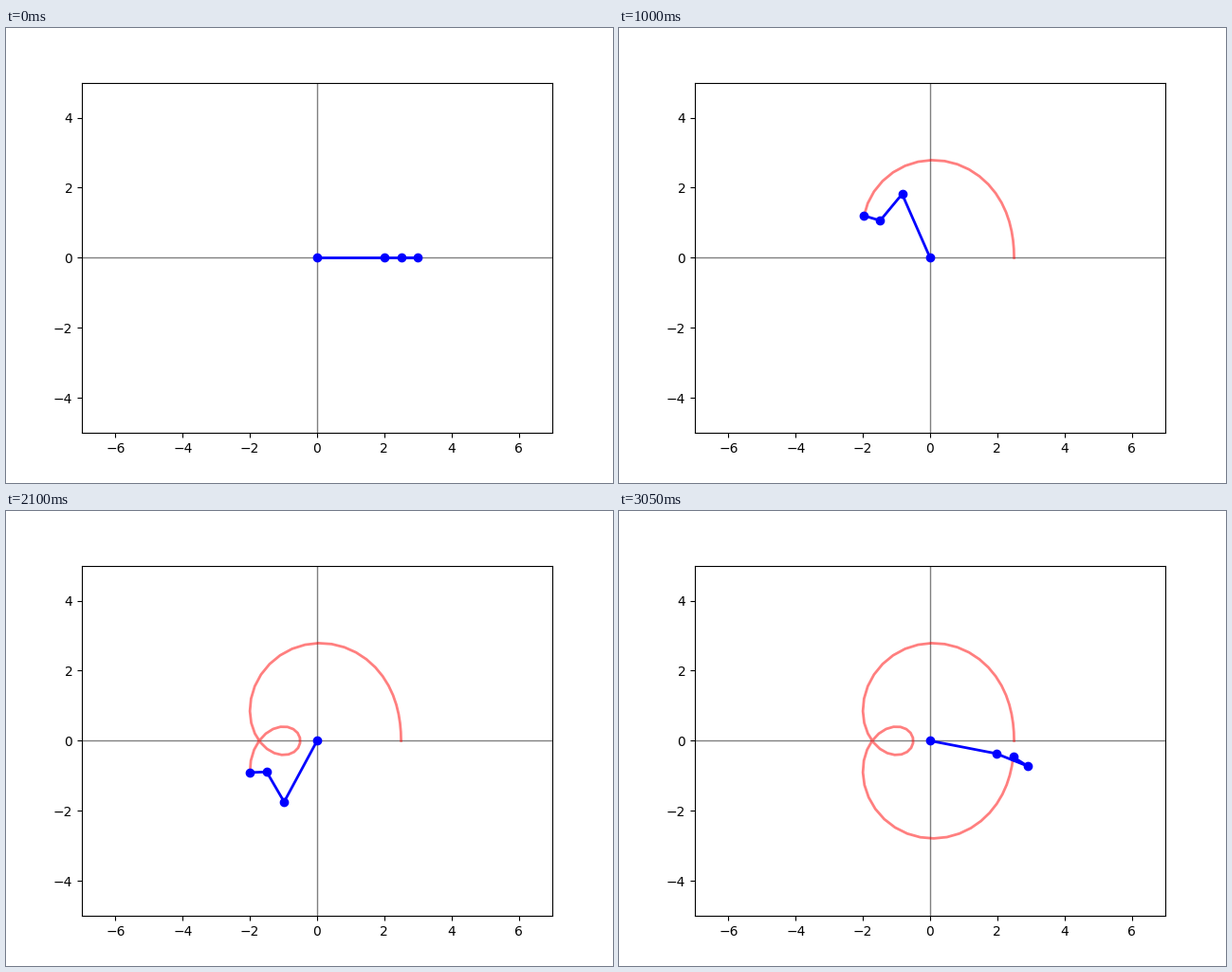
A matplotlib script for the animation above (3.1 s loop, 640 px wide and 480 px high).

```python
import numpy as np
import matplotlib.pyplot as plt
from matplotlib.animation import FuncAnimation

FRAMES = 62
STEP = 0.1  # radians per frame
ARMS = (2.0, 1.0, -0.5)  # arm k turns k times as fast as the first


def joints(t):
    """Joint positions of the arm chain as complex numbers, hub first."""
    arms = [r * np.exp(1j * k * t) for k, r in enumerate(ARMS, start=1)]
    return np.cumsum([0j, *arms])


tips = np.array([joints(STEP * i)[-1] for i in range(FRAMES)])

fig, ax = plt.subplots(figsize=(6.4, 4.8), dpi=100)
ax.set_xlim(-7, 7)
ax.set_ylim(-5, 5)
ax.axhline(0, color="gray", lw=1)
ax.axvline(0, color="gray", lw=1)
trace, = ax.plot([], [], "r-", lw=2, alpha=0.5)
chain, = ax.plot([], [], "bo-", lw=2)


def update(i):
    pts = joints(STEP * i)
    chain.set_data(pts.real, pts.imag)
    path = tips[:i + 1]
    trace.set_data(path.real, path.imag)
    return trace, chain


anim = FuncAnimation(fig, update, frames=FRAMES, interval=50,
                     repeat=True, repeat_delay=0, blit=False)
plt.show()
```
